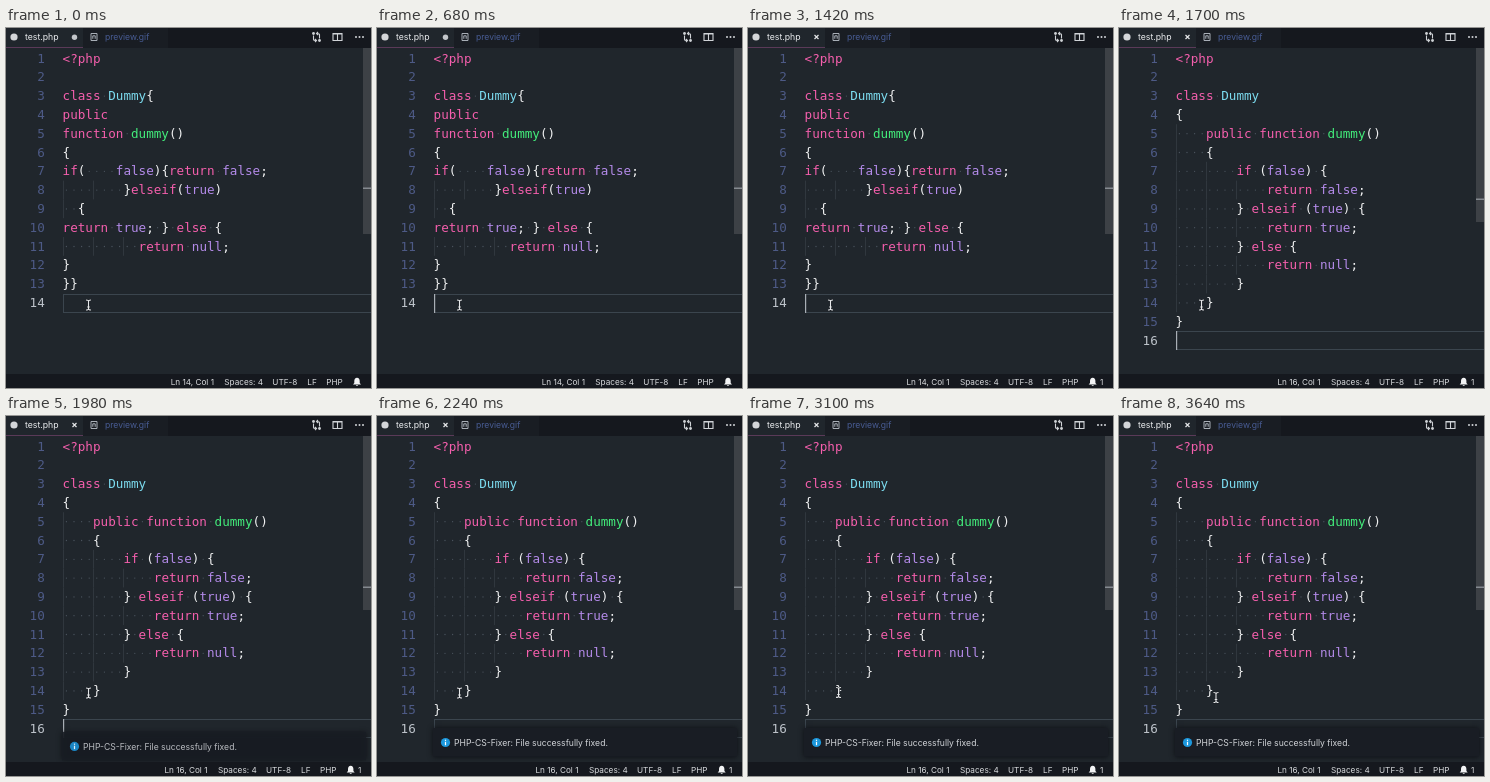
Recreate the animation shown at these times as an HTML page with a canvas. Size 365 by 360 pixels, loop 5.34 s.

```html
<!DOCTYPE html>
<html lang="en">
<head>
<meta charset="utf-8">
<title>Code formatting</title>
<style>
  html, body { margin: 0; width: 100%; height: 100%; overflow: hidden; background: #20262c; }
  canvas { display: block; width: 365px; height: 360px; }
</style>
</head>
<body>
<canvas></canvas>
<script>
const W = 365, H = 360, LOOP = 5340;
const LEFT = 56.6, TOP = 21, CHAR = 7.6, LINE = 18.8;
const SAVED = 1400, FORMATTED = 1600, TOAST = 1770, TOAST_TIME = 330;
const MONO = '12.62px "DejaVu Sans Mono", "Noto Sans Mono", monospace';
const UI = 'Inter, Roboto, sans-serif';

const messy = `<?php

class Dummy{
public
function dummy()
{
if(    false){return false;
        }elseif(true)
  {
return true; } else {
          return null;
}
}}
`.split('\n');

const tidy = `<?php

class Dummy
{
    public function dummy()
    {
        if (false) {
            return false;
        } elseif (true) {
            return true;
        } else {
            return null;
        }
    }
}
`.split('\n');

// Pointer path: time, x, y
const path = [[2760, 82.5, 277], [3080, 90.5, 276.5], [3240, 91.5, 277], [3600, 97, 281.5]];

const canvas = document.querySelector('canvas');
const ctx = canvas.getContext('2d');
const scale = window.devicePixelRatio || 1;
canvas.width = W * scale;
canvas.height = H * scale;

function rect(x, y, w, h, color) {
  ctx.fillStyle = color;
  ctx.fillRect(x, y, w, h);
}

function text(str, x, y, color, font, align = 'left') {
  ctx.font = font;
  ctx.fillStyle = color;
  ctx.textAlign = align;
  ctx.fillText(str, x, y);
}

function disc(x, y, r, color) {
  ctx.fillStyle = color;
  ctx.beginPath();
  ctx.arc(x, y, r, 0, 7);
  ctx.fill();
}

function stroke(d, x, y, color, width = 1) {
  ctx.save();
  ctx.translate(x, y);
  ctx.strokeStyle = color;
  ctx.lineWidth = width;
  ctx.stroke(new Path2D(d));
  ctx.restore();
}

function tokenColor(token) {
  if (token === 'Dummy') return '#7cdcf0';
  if (token === 'dummy') return '#43ee7c';
  if (/^(true|false|null)$/.test(token)) return '#b48bea';
  return /\w/.test(token) ? '#f55fad' : '#f0f1f2';
}

function drawCode(lines) {
  lines.forEach((line, i) => {
    const top = TOP + i * LINE, base = top + 13.5;
    const active = i === lines.length - 1;
    text(i + 1, 38.8, base, active ? '#bcc2c9' : '#4d5a86', MONO, 'right');

    const indent = line.search(/\S|$/);
    for (let c = 0; c < indent; c += 4) rect(Math.round(LEFT + c * CHAR), top, 1, LINE, '#30373e');

    for (const { 0: token, index } of line.matchAll(/<\?php|\w+|\s|[^\w\s]/g)) {
      const x = LEFT + index * CHAR;
      if (token === ' ') disc(x + CHAR / 2, base - 4, 0.65, '#4b555f');
      else text(token, x, base, tokenColor(token), MONO);
    }
  });
}

function caretOn(t) {
  if (t < FORMATTED) return t >= 400 && t % 1000 >= 400 && t % 1000 < 900;
  return t < 3100 && (t - FORMATTED) % 1000 < 500;
}

function drawCurrentLine(count, t) {
  const y = Math.ceil(TOP + (count - 1) * LINE);
  rect(57, y, W - 57, 1, '#3b454e');
  rect(57, y + 18, W - 57, 1, '#3b454e');
  rect(57, y, 1, 19, '#3b454e');
  if (caretOn(t)) rect(57, y, 1.2, 19, '#a8aeb5');
}

function drawRuler(formatted) {
  rect(357, 20, 8, formatted ? 174 : 186, '#3d4146');
  rect(357, formatted ? 170.5 : 159.5, 8, 1.5, '#858a90');
}

function drawTabs(saved) {
  rect(0, 0, W, 20, '#15181e');
  rect(0, 0, 77, 20, '#20262c');
  rect(77, 0, 85, 20, '#191d23');
  rect(0, 19, 77, 1, '#5a3a58');
  disc(8, 9, 3.6, '#d4d6d9');
  text('test.php', 19, 12.3, '#eceef0', '8.7px ' + UI);
  if (saved) stroke('M-2-2L2 2M2-2L-2 2', 68.5, 9, '#e4e6e8', 1.2);
  else disc(68.5, 9.3, 2.7, '#c3c6ca');

  stroke('M-3-3.5H3V3.5H-3ZM-1.2 1.8V-1.2H1.2V1.8', 88, 9, '#a9afb7');
  text('preview.gif', 99, 12.3, '#485c94', '8.6px ' + UI);

  const icon = '#d0d3d7';
  stroke('M-3-1.5V2.5Q-3 3.5-1 3.5H0M-1.5 2L0 3.5L-1.5 5M3 1.5V-2.5Q3-3.5 1-3.5H0M1.5-5L0-3.5L1.5-2', 310.5, 9, icon, 1.1);
  disc(307.5, 5.5, 1.4, icon);
  disc(313.5, 12.5, 1.4, icon);
  stroke('M-4.5-3.5H4.5V3.5H-4.5ZM0-3.5V3.5M-4.5-3H4.5', 331.5, 9, icon, 1.1);
  for (const x of [350, 353.5, 357]) disc(x, 9, 1, icon);
}

function drawToast(t) {
  const p = Math.min(1, (t - TOAST) / TOAST_TIME);
  if (p <= 0) return;
  const ease = 1 - (1 - p) ** 2;
  ctx.save();
  ctx.globalAlpha = ease;
  ctx.translate(0, 30 * (1 - ease));
  ctx.shadowColor = '#0d1014';
  ctx.shadowBlur = 5 * scale;
  rect(56, 312, 304, 28.5, '#191d24');
  ctx.shadowColor = 'transparent';
  disc(68.5, 326.5, 4.6, '#1c97dc');
  rect(67.9, 325.8, 1.2, 3.4, '#fff');
  rect(67.9, 323.7, 1.2, 1.2, '#fff');
  text('PHP-CS-Fixer: File successfully fixed.', 77, 329.7, '#d2d5d9', '8.6px ' + UI);
  ctx.restore();
}

function drawStatus(line, saved) {
  rect(0, 346, W, 14, '#15181e');
  const shift = saved ? -6.3 : 0;
  const items = [[`Ln ${line}, Col 1`, 164.7], ['Spaces: 4', 218.3], ['UTF-8', 266.3], ['LF', 301.3], ['PHP', 320.3]];
  for (const [label, x] of items) text(label, x + shift, 357, '#d9dbde', '8.2px ' + UI);
  ctx.save();
  ctx.translate(351 + shift, 354);
  ctx.fillStyle = '#f2f3f4';
  ctx.fill(new Path2D('M-4 2.5L-2.7 1V-1Q-2.7-4 0-4.3Q2.7-4 2.7-1V1L4 2.5ZM-1.2 3.2H1.2Q0 5-1.2 3.2'));
  ctx.restore();
  if (saved) text('1', 352, 357, '#d9dbde', '8.2px ' + UI);
}

function drawPointer(t) {
  let [, x, y] = path[0];
  for (let i = 1; i < path.length; i++) {
    const [t0, x0, y0] = path[i - 1], [t1, x1, y1] = path[i];
    if (t < t0) break;
    const p = Math.min(1, (t - t0) / (t1 - t0)), k = p * p * (3 - 2 * p);
    x = x0 + (x1 - x0) * k;
    y = y0 + (y1 - y0) * k;
  }
  const beam = 'M-2.5-5Q0-5 0-3.5Q0-5 2.5-5M0-4V4M-2.5 5Q0 5 0 3.5Q0 5 2.5 5M-1.3 2H1.3';
  stroke(beam, x, y, '#15181e', 2);
  stroke(beam, x, y, '#e6e8ea', 1.1);
}

function draw(now) {
  const t = now % LOOP;
  const saved = t >= SAVED, formatted = t >= FORMATTED;
  const lines = formatted ? tidy : messy;
  ctx.setTransform(scale, 0, 0, scale, 0, 0);
  rect(0, 0, W, H, '#20262c');
  drawRuler(formatted);
  drawCurrentLine(lines.length, t);
  drawCode(lines);
  drawTabs(saved);
  drawToast(t);
  drawStatus(lines.length, saved);
  drawPointer(t);
}

const start = performance.now();
function tick() {
  draw(performance.now() - start);
  requestAnimationFrame(tick);
}
tick();
</script>
</body>
</html>
```
